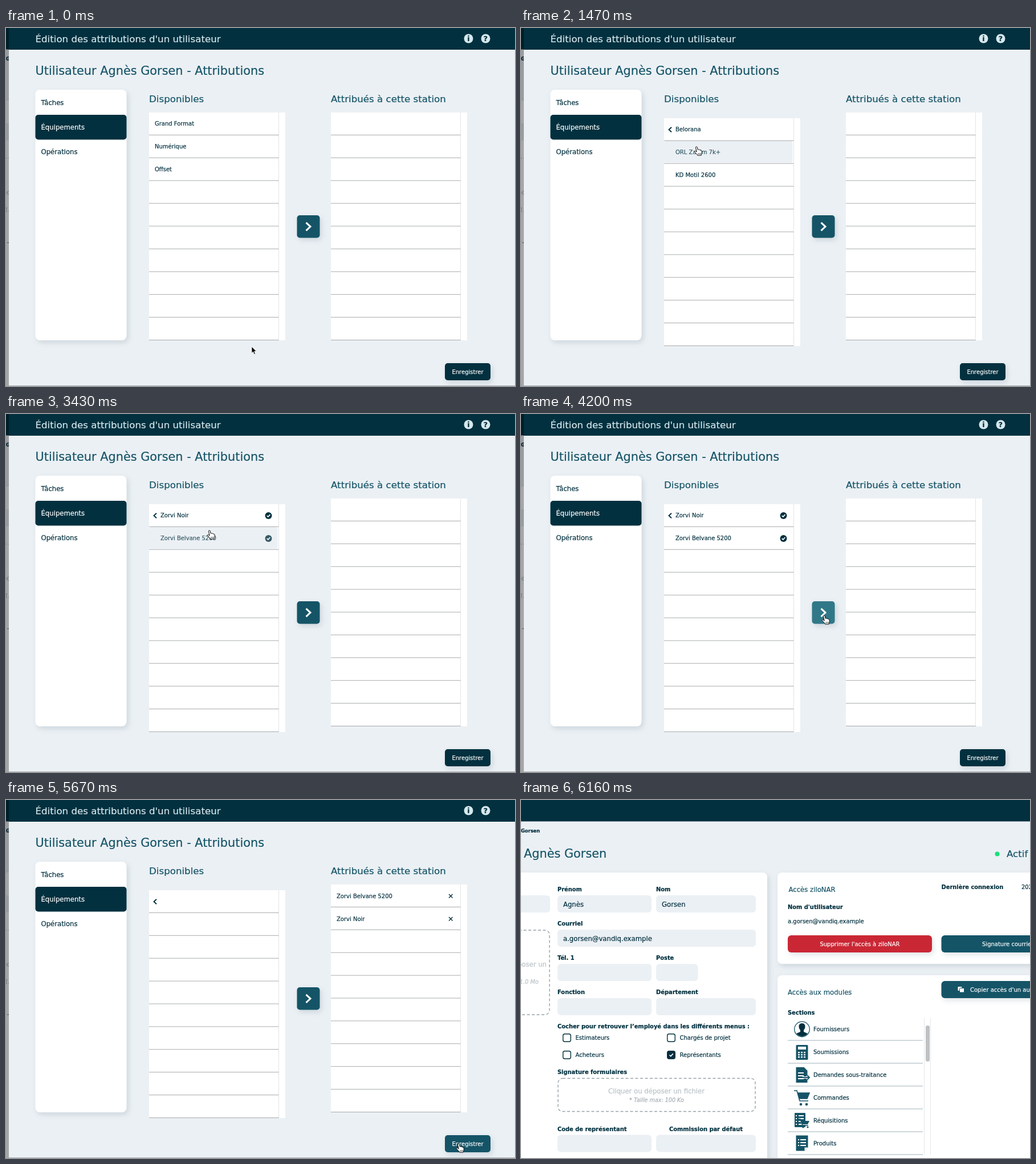
An HTML page for the animation above (6.65 s loop, 893 by 627 pixels).

```html
<!DOCTYPE html>
<html lang="fr">
<head>
<meta charset="utf-8">
<title>Attributions</title>
<style>
html, body { margin: 0; width: 100%; height: 100%; overflow: hidden; background: #ebf0f4; }
svg { display: block; width: 893px; height: 627px; }
text { font-family: "DejaVu Sans", Verdana, sans-serif; white-space: pre; }
.sh { filter: drop-shadow(3px 4px 5px rgba(10, 50, 70, .13)); }
</style>
</head>
<body>
<svg id="stage" viewBox="0 0 893 627">
  <g id="page"></g>
  <rect id="dim" width="893" height="627" fill="#000"/>
  <g id="drawer">
    <g id="frame"></g>
    <g id="lists"></g>
  </g>
  <g id="pointer"></g>
</svg>
<script>
const LOOP = 6650, STEP = 70;
const DARK = '#02303f', TEAL = '#155467', BG = '#ebf0f4', PALE = '#b9c1c6';
const FIRST = 'Agnès', LAST = 'Gorsen', USER = FIRST + ' ' + LAST;
const MAIL = 'a.gorsen@vandiq.example', APP = 'ziloNAR';
const ROW = 39.9;
const $ = id => document.getElementById(id);

// Shape helpers; text is placed by the middle of its capitals.
const rect = (x, y, w, h, fill, r = 0, more = '') =>
  `<rect x="${x}" y="${y}" width="${w}" height="${h}" rx="${r}" fill="${fill}" ${more}/>`;
const text = (x, cy, s, size = 10, fill = DARK, more = '') =>
  `<text x="${x}" y="${cy + size * .365}" font-size="${size}" fill="${fill}" stroke="${fill}" stroke-width=".2" ${more}>${s}</text>`;
const bold = (x, cy, s, size = 9.9) => text(x, cy, s, size, DARK, 'font-weight="700"');
const line = (d, color, w = 1, more = '') =>
  `<path d="${d}" fill="none" stroke="${color}" stroke-width="${w}" ${more}/>`;
const shape = (d, fill = TEAL) => `<path d="${d}" fill="${fill}"/>`;
const disc = (x, y, r, fill) => `<circle cx="${x}" cy="${y}" r="${r}" fill="${fill}"/>`;
const at = (x, y, s) => `<g transform="translate(${x} ${y})">${s}</g>`;
const MID = 'text-anchor="middle"', SHADOW = 'class="sh"';

const tick = (x, y, s = 1) =>
  line(`M${x - 2.7 * s} ${y}l${2 * s} ${2.1 * s} ${3.6 * s} ${-4 * s}`, '#fff', 1.6);

function checkbox(x, y, label, on) {
  return rect(x + .7, y + .7, 13.6, 13.6, on ? DARK : '#fff', 3, `stroke="${DARK}" stroke-width="1.4"`) +
    (on ? tick(x + 7.5, y + 7.5, 1.1) : '') + text(x + 22.5, y + 7.5, label);
}

const dashed = (x, y, w, h) =>
  rect(x, y, w, h, 'none', 8, 'stroke="#98a2a8" stroke-width="1.4" stroke-dasharray="5 3.5"');

function drawIcons() {
  const bars = (x, y, w, n) => Array.from({ length: n }, (_, i) => rect(x, y + 5 * i, w, 2, '#fff')).join('');
  const keys = Array.from({ length: 9 }, (_, i) =>
    rect(486 + 5 * (i % 3), 441 + 4 * Math.floor(i / 3), 3, 2.4, '#fff')).join('');
  const arrow = 'M494 486h12m-4-4 4 4-4 4';
  return `<circle cx="493" cy="401.5" r="13.3" fill="#fff" stroke="${TEAL}" stroke-width="1.3"/>` +
    shape('M493 391c4 0 6 3 5.4 7-.5 3-1.7 4-2.4 5v3l7 3q-4 5-10 5t-10-5l7-3v-3c-.7-1-1.9-2-2.4-5-.6-4 1.4-7 5.4-7z', DARK) +
    rect(482.5, 429, 21, 26, TEAL, 1.5) + rect(486, 432, 14, 5, '#fff') + keys +
    shape('M482.5 468h14l6 6v21h-20z') + bars(486, 477, 10, 3) + line(arrow, '#fff', 4) + line(arrow, TEAL, 1.8) +
    at(479, 509, line('M0 0H5L10 18H25M6 4H27L23 14H9', TEAL, 1.6) + shape('M6 4H27L23 14H9z') +
      disc(12, 24, 2.3, TEAL) + disc(22, 24, 2.3, TEAL)) +
    rect(480, 548, 19, 25, TEAL, 1) + bars(487, 552, 9, 4) + bars(482, 552, 2, 4) +
    at(487, 559, shape('M3 3H20L17 10H6z', '#fff') + line('M0 0H3L7 11H17', TEAL, 1.5) +
      shape('M4 3H19L16 9H6z') + disc(8, 14, 1.6, TEAL) + disc(16, 14, 1.6, TEAL)) +
    shape('M482.5 587.5h21v21l-6 6h-15z') + bars(490, 594, 10, 3) + bars(486, 594, 2, 3) +
    shape('M497.5 614.5v-6h6z', '#fff');
}

function drawPage() {
  const field = (x, y, w, label, value = '') =>
    bold(x, y - 10.5, label) + rect(x, y, w, 30, BG, 6) + text(x + 10, y + 16, value, 11.67);
  return rect(0, 0, 893, 627, BG) + rect(0, 0, 893, 37.5, DARK) +
    bold(0, 53.5, LAST, 8.33) + text(5, 93.5, USER, 20.83, TEAL) +
    disc(835.5, 94.5, 4, '#17e07a') + text(852, 93.5, 'Actif', 16.67, TEAL) +
    rect(-20, 127, 452, 520, '#fff', 8, SHADOW) +
    rect(450, 127, 463, 160, '#fff', 8, SHADOW) +
    rect(450, 307, 463, 340, '#fff', 8, SHADOW) +
    rect(-20, 167, 71, 30, BG, 6) + dashed(-80, 228, 130, 148) +
    text(45, 288, 'Cliquer ou déposer un', 11.67, PALE, 'text-anchor="end"') +
    text(31, 318.5, '* Taille max: 1.0 Mo', 10, PALE, 'text-anchor="end" font-style="italic"') +
    field(64, 167, 165, 'Prénom', FIRST) + field(237, 167, 175, 'Nom', LAST) +
    field(64, 227, 348, 'Courriel', MAIL) +
    field(64, 287, 165, 'Tél. 1') + field(237, 287, 73.5, 'Poste') +
    field(64, 347, 165, 'Fonction') + field(237, 347, 175, 'Département') +
    bold(64, 396.5, 'Cocher pour retrouver l’employé dans les différents menus :') +
    checkbox(73, 409, 'Estimateurs') + checkbox(256, 409, 'Chargés de projet') +
    checkbox(73, 439, 'Acheteurs') + checkbox(256, 439, 'Représentants', true) +
    bold(64, 476.5, 'Signature formulaires') + dashed(65, 487.5, 346, 58) +
    text(237.5, 510, 'Cliquer ou déposer un fichier', 11.67, PALE, MID) +
    text(238, 525.5, '* Taille max: 100 Ko', 9.6, '#a5adb3', MID + ' font-style="italic"') +
    field(64, 586.5, 165, 'Code de représentant') + field(237, 586.5, 175, '') +
    bold(260, 576, 'Commission par défaut') +
    text(469.5, 157, 'Accès ' + APP, 11.67, TEAL) +
    bold(737.5, 152, 'Dernière connexion') + text(878, 152, '2023') +
    bold(468, 187, "Nom d'utilisateur") + text(468, 212, MAIL) +
    rect(468, 237, 253, 30, '#ca2735', 6, SHADOW) +
    text(594.5, 252, "Supprimer l'accès à " + APP, 10, '#fff', MID) +
    rect(737.5, 237, 200, 30, TEAL, 6, SHADOW) +
    text(809, 252, 'Signature courriel', 10, '#fff') +
    text(468, 337, 'Accès aux modules', 11.67, TEAL) +
    rect(737.5, 317, 200, 30, TEAL, 6, SHADOW) +
    rect(766.5, 327, 7, 7, '#fff', 1) +
    rect(769.5, 329.5, 8, 7.5, '#fff', 1, `stroke="${TEAL}" stroke-width="1"`) +
    text(788, 332, "Copier accès d'un autre", 10, '#fff') +
    bold(468, 372, 'Sections') +
    ['Fournisseurs', 'Soumissions', 'Demandes sous-traitance', 'Commandes', 'Réquisitions', 'Produits']
      .map((s, i) => text(513, 401.5 + 40 * i, s) + line(`M468 ${421 + 40 * i}H705`, '#9fb2ba')).join('') +
    drawIcons() +
    line('M707.5 382V621M718.5 382V621', '#e3e6e8') + rect(710, 395, 7, 63, '#bfc1c2', 3);
}

function grid(x, y) {
  let d = '';
  for (let i = 1; i <= 10; i++) d += `M${x} ${y + ROW * i - .5}h227.5`;
  return rect(x, y, 239, 399, '#fff') + line(`M${x + 227.5} ${y}v399`, '#e2e4e6') + line(d, '#a8abad');
}

function drawFrame() {
  const badge = (x, s) => disc(x, 18.5, 8, '#d6e8ed') + text(x, 18.7, s, 12.5, DARK, MID + ' font-weight="700"');
  return rect(5, 0, 888, 627, BG) + rect(5, 0, 888, 38, DARK) +
    text(51.5, 19, "Édition des attributions d'un utilisateur", 16.67, '#d6e8ed') +
    badge(811.5, 'i') + badge(841.5, '?') +
    text(51.5, 74, `Utilisateur ${USER} - Attributions`, 20.83, TEAL) +
    rect(51.5, 108, 160, 439, '#fff', 8, SHADOW) + rect(51.5, 152, 160, 43.5, DARK, 5) +
    text(61.5, 130.5, 'Tâches', 11.67) + text(61.5, 174, 'Équipements', 11.67, '#fff') +
    text(61.5, 217, 'Opérations', 11.67) +
    text(251, 124, 'Disponibles', 16.67, TEAL) +
    text(570, 124, 'Attribués à cette station', 16.67, TEAL) +
    grid(570, 148) + line('M5 626.5H893', '#a9afb3');
}

// Pointer stops: time, x, y.
const PATH = [
  [0, 431, 558], [70, 385, 430], [140, 341, 296], [280, 341, 296], [840, 305, 189], [1050, 305, 189],
  [1470, 308, 208], [1750, 308, 208], [2100, 304, 229], [2170, 304, 229], [2310, 303.5, 222],
  [2660, 303.5, 222], [2940, 322, 189], [3150, 322, 189], [3430, 357, 204], [3780, 558, 357],
  [3920, 532, 353], [4200, 532, 353], [4340, 560, 359], [4480, 560, 359], [5180, 792, 576],
  [5390, 794, 602], [5880, 794, 602], [6160, 794, 645]
];
const CLICKS = [840, 2520, 2940, 3920, 5390], RING = 280;
const SWAP = { sub: 1120, ready: 1540, check2: 2730, check1: 3150, moved: 4270 };
const SLIDE = [5670, 5880];
const PRESSES = ['Zorvi Noir', 'Zorvi Belvane 5200'];

const ease = u => u * u * (3 - 2 * u);
const progress = (t, a, b) => Math.min(1, Math.max(0, (t - a) / (b - a)));

function pointerAt(t) {
  const i = PATH.findIndex(p => p[0] > t);
  if (i < 0) return PATH[PATH.length - 1].slice(1);
  const [t0, x0, y0] = PATH[i - 1], [t1, x1, y1] = PATH[i];
  const e = ease(progress(t, t0, t1));
  return [x0 + (x1 - x0) * e, y0 + (y1 - y0) * e];
}

function rowsAt(t) {
  if (t < SWAP.sub) return ['Grand Format', 'Numérique', 'Offset'];
  if (t < SWAP.ready) return ['Belorana', 'ORL Zadim 7k+', 'KD Motil 2600'];
  return t < SWAP.moved ? PRESSES : [];
}

const inside = (x, y, l, t, w, h) => x >= l && x < l + w && y >= t && y < t + h;

// What the pointer is over: a row index, 'go', 'save' or null.
function targetAt(t, x, y) {
  if (t > SLIDE[0]) return null;
  if (inside(x, y, 511, 328, 40, 40)) return 'go';
  if (inside(x, y, 770, 587, 80, 30)) return 'save';
  const top = t < SWAP.sub ? 148 : 158;
  const row = Math.floor((y - top) / ROW);
  return x >= 251 && x < 477 && rowsAt(t)[row] ? row : null;
}

function drawLists(t, over) {
  const sub = t >= SWAP.sub, moved = t >= SWAP.moved, top = sub ? 158 : 148;
  let s = grid(251, top);
  rowsAt(t).forEach((name, i) => {
    const y = top + ROW * i;
    const checked = t >= (i ? SWAP.check2 : SWAP.check1);
    if (over === i) s += rect(251, y, 225.5, ROW - 1, BG, 4);
    s += `<g opacity="${over === i ? .78 : 1}">` + text(sub ? 271 : 261, y + 19.8, name) +
      (checked ? disc(460.5, y + 20, 6, DARK) + tick(460.5, y + 20) : '') + '</g>';
  });
  if (sub) s += line('M264 173.8l-4.5 4.2 4.5 4.2', DARK, 1.9);
  if (moved) {
    s += [...PRESSES].reverse().map((name, i) => text(580, 168 + ROW * i, name) +
      line(`M777 ${165 + ROW * i}l6.5 6.5m0-6.5l-6.5 6.5`, DARK, 1.4)).join('');
  }
  return s + rect(510.5, 328, 40, 39.5, over === 'go' ? '#307888' : TEAL, 5, SHADOW) +
    line('M526.5 340.8l7.5 7-7.5 7', '#fff', 3) +
    rect(770, 587, 80, 30, over === 'save' ? TEAL : DARK, 5, SHADOW) +
    text(810, 602, 'Enregistrer', 10, '#fff', MID);
}

const HAND = 'M-1.6 1.3C-1.6-.4 .8-.6 1.2 1L2.2 5.2C3 4.4 4.4 4.6 4.8 5.6C5.6 5 6.8 5.3 7.1 6.4C8 5.9 9.2 6.5 9.2 7.8' +
  'V10.5C9.2 12 8.4 12.5 8.2 15H1.6C1 13-1.5 11.2-3.6 8.8C-4.2 7.6-2.6 6.8-1.4 7.8L.2 9Z';
const ARROW = 'M0 0V11.5L2.6 9 4.5 13.4 6.5 12.5 4.6 8.3H8.2Z';

function drawPointer(t, x, y, hand) {
  const click = CLICKS.find(c => t >= c && t < c + RING);
  const fade = 1 - ((t - click) / RING) ** 2;
  const ring = click === undefined ? '' :
    `<circle r="24" fill="none" stroke="#000" stroke-width="2.4" opacity="${fade}"/>`;
  return at(x, y, ring + (hand
    ? `<path d="${HAND}" fill="#fff" stroke="#000"/>` + line('M3 11v2.5M5 11v2.5M7 11v2.5', '#000', .7)
    : `<path d="${ARROW}" fill="#000" stroke="#fff" stroke-width=".8"/>`));
}

$('page').innerHTML = drawPage();
$('frame').innerHTML = drawFrame();

let shown = -1;
function render(time) {
  const t = Math.floor(time / STEP) * STEP;
  if (t === shown) return;
  shown = t;
  const [x, y] = pointerAt(t), over = targetAt(t, x, y);
  const out = ease(progress(t, ...SLIDE));
  $('dim').setAttribute('opacity', .35 * (1 - out));
  $('drawer').setAttribute('transform', `translate(${893 * out} 0)`);
  $('lists').innerHTML = drawLists(t, over);
  $('pointer').innerHTML = drawPointer(t, x, y, over !== null);
}

const start = performance.now();
function loop() {
  render((performance.now() - start) % LOOP);
  requestAnimationFrame(loop);
}
loop();
</script>
</body>
</html>
```
